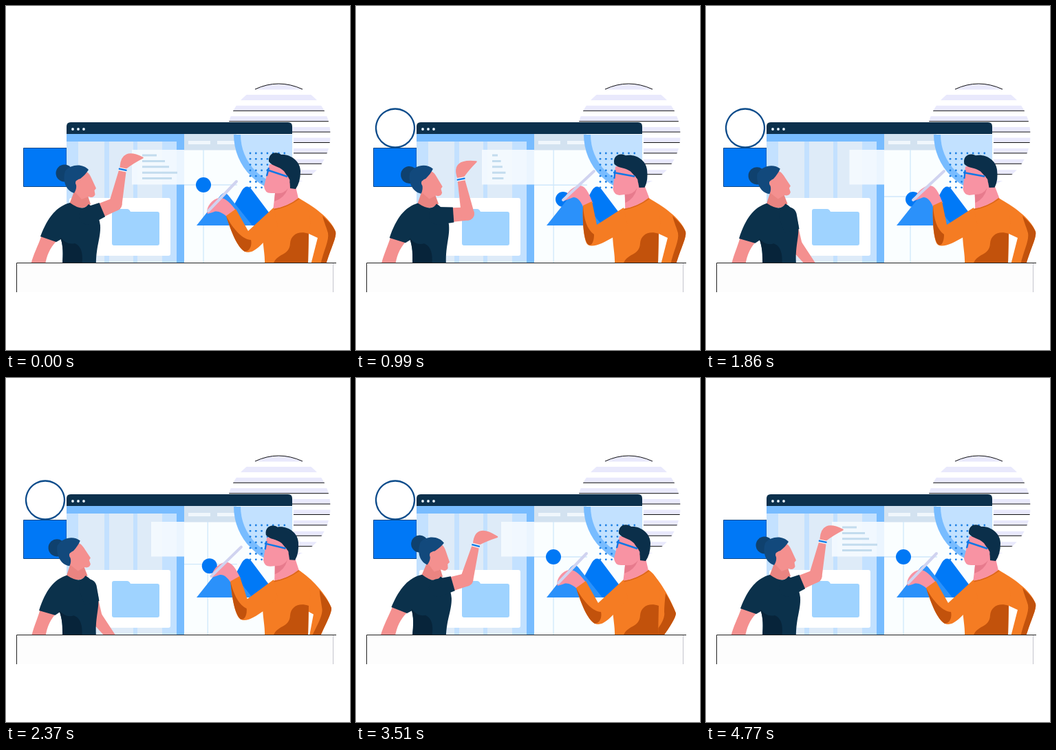
Write an HTML page that moves like this. It is 500 px wide and 500 px high and loops after 4.92 s.

```html
<!DOCTYPE html>
<html>
<head>
<meta charset="utf-8">
<style>
html, body { margin: 0; width: 100%; height: 100%; overflow: hidden; background: #fff; }
svg { display: block; width: 100vw; height: 100vh; }
</style>
</head>
<body>
<svg viewBox="0 0 500 500">
  <defs>
    <clipPath id="disc"><circle cx="396.5" cy="187.5" r="75"/></clipPath>
    <clipPath id="panel"><path d="M259 187H416V375H259Z"/></clipPath>
  </defs>

  <g id="stripes" clip-path="url(#disc)"></g>
  <path d="M362 121Q396 105 431 121" fill="none" stroke="#111"/>
  <path d="M25.5 206.5H88V262.5H25.5Z" fill="#0078f6" stroke="#0b4a8c"/>
  <path id="ring" d="M57 149.5a28 28 0 1 0 .01 0" pathLength="1" fill="none" stroke="#0d4c8b" stroke-width="2.3"/>

  <!-- window -->
  <path d="M88 186H259V375H88Z" fill="#c3e1ff"/>
  <path d="M105 197h38v178h-38zM150 197h35v178h-35zM191 197h36v178h-36z" fill="#deebf8"/>
  <path d="M88 186H259V375H248V197H88Z" fill="#78bcff"/>
  <path d="M259 186H418V375H259Z" fill="#fafeff"/>
  <path d="M259 186H335V209.5H259Z" fill="#d3e2f0"/>
  <path d="M265 196h32v5h-32zM307 196h26v5h-26z" fill="#f0f6fc"/>
  <g clip-path="url(#panel)">
    <circle cx="416" cy="187" r="85" fill="#78bcff"/>
    <circle cx="416" cy="187" r="75" fill="#c2e1ff"/>
  </g>
  <g id="dots" fill="#1b7fe3"></g>
  <path d="M88 186V175Q88 169 94 169H410Q416 169 416 175V186Z" fill="#0b304c"/>
  <path d="M97 179h0M105 179h0M113 179h0" stroke="#e8f4ff" stroke-width="3.8" stroke-linecap="round"/>
  <rect x="92" y="279" width="147" height="84" rx="3" fill="#fff"/>
  <path d="M154 298Q154 295 157 295H176Q179 295 181 299H220Q223 299 223 302V345Q223 348 220 348H157Q154 348 154 345Z" fill="#9fd3ff"/>

  <path id="guides" fill="none" stroke="#cfe8fb" stroke-width="1.3"/>
  <path d="M315 319L343 268Q350 257 358 268L388 308V319Z" fill="#0079f7"/>
  <circle id="ball" r="11" fill="#0078f5"/>
  <path d="M277 319L312 275Q318 268 323 275L358 319Z" fill="#2b91fa"/>
  <rect id="card" y="209" height="50.5" fill="#f5faff" opacity=".93"/>
  <path id="text" fill="none" stroke="#c3dcee" stroke-width="3"/>

  <!-- woman -->
  <g fill="#f4908f" stroke-linejoin="round">
    <path id="upper"/><path id="fore"/>
    <path id="hand" stroke="#f4908f" stroke-width="2"/>
    <path id="band" fill="none" stroke="#fff" stroke-width="5"/>
    <path id="bandBlue" fill="none" stroke="#1b80e6" stroke-width="2.6"/>
  </g>
  <g id="woman">
    <path d="M52 333L74 341C63 352 59 364 57 376H36C40 360 46 350 52 333Z" fill="#f4908f"/>
    <path d="M102 262L92 288Q108 299 123 288L117 270Z" fill="#ea8481"/>
    <path d="M93 286C74 291 61 306 50 335L73 343L80 339C84 355 82 365 82 380H131C130 350 138 338 137 319Q134 297 120 288Q112 300 93 286Z" fill="#0b314b"/>
    <path d="M82 380C83 360 84 352 79 336Q88 348 100 345C112 350 112 365 110 380Z" fill="#07243a"/>
    <g id="womanHead">
      <path d="M106 240C118 237 122 245 125 252L131 265L128.5 268L129.5 274Q127 280 120 277L110 281L98 268Z" fill="#f4908f"/>
      <circle cx="85" cy="243" r="12.5" fill="#0f416e"/>
      <path d="M120 238C112 229 95 229 86 240C82 252 86 268 99 272Q103 266 102 260Q101 252 108 251C113 247 117 243 120 238Z" fill="#12497c"/>
      <circle cx="105" cy="257" r="4" fill="#f4908f"/>
    </g>
  </g>
  <path id="sleeve" fill="#0b314b"/>

  <!-- man -->
  <path id="farArm" fill="#f57c23"/>
  <path id="farShade" fill="#c2520c"/>
  <g id="manHead">
    <path d="M383 230L375 262Q376 272 385 272L391 272L388 298Q404 302 426 284L420 258L412 230Z" fill="#f893a3"/>
    <path d="M391 272Q403 274 410 265Q404 280 390 284Z" fill="#e77b8d"/>
    <path d="M382 226C381 214 392 210 400 216C414 215 428 226 428 240Q428 256 421 266L413 265Q413 250 408 246L404 240C396 232 388 234 382 226Z" fill="#0b2f4a"/>
    <circle cx="408" cy="254" r="4.5" fill="#f893a3"/>
    <path d="M382 235L379 247M379 238L409 248" fill="none" stroke="#0f78e6" stroke-width="2.4"/>
  </g>
  <path d="M387 295Q408 293 425 279C440 288 446 310 440 331L439 376H376C377 360 372 345 373 322Z" fill="#f57c23"/>
  <path d="M388 376C394 358 412 364 413 345C414 332 426 326 440 331L439 376Z" fill="#c2520c"/>
  <path d="M389 296Q410 292 426 280" fill="none" stroke="#d9651a" stroke-width="1.5"/>
  <path id="manHand" fill="#f893a3"/>
  <path id="pen" stroke="#d0d3f0" stroke-width="4" stroke-linecap="round"/>
  <path id="nearArm" fill="#f57c23"/>
  <path id="nearShade" fill="#c2520c"/>

  <!-- desk -->
  <path d="M15 374H476V416H15Z" fill="#fdfdfd"/>
  <path d="M15.5 416V373.5H480" fill="none" stroke="#222"/>
  <path d="M475.500 374V416" stroke="#c4c4cc"/>
</svg>

<script>
const LOOP = 4920, LAST = 4770, STEP = 30;
const $ = id => document.getElementById(id);
const set = (id, attrs) => { for (const k in attrs) $(id).setAttribute(k, attrs[k]); };

const ramp = (t, from, to) => {
  const u = Math.min(1, Math.max(0, (t - from) / (to - from)));
  return u * u * (3 - 2 * u);
};
// Rises from 0 to 1, holds, then falls back.
const pulse = (t, rise, risen, fall, fallen) => ramp(t, rise, risen) - ramp(t, fall, fallen);

// Smooth monotone interpolation through rows of [time, ...values].
function track(rows, t) {
  const next = rows.findIndex(r => r[0] > t);
  if (next < 0) return rows[rows.length - 1].slice(1);
  const i = next - 1, h = rows[next][0] - rows[i][0], u = (t - rows[i][0]) / h;
  return rows[i].slice(1).map((p, n) => {
    const slope = j => rows[j] && rows[j + 1]
      ? (rows[j + 1][n + 1] - rows[j][n + 1]) / (rows[j + 1][0] - rows[j][0]) : 0;
    const tangent = j => {
      const a = slope(j - 1), b = slope(j);
      return a * b > 0 ? 2 * a * b / (a + b) : 0;
    };
    return p + (rows[next][n + 1] - p) * ramp(u, 0, 1)
      + h * u * (1 - u) * ((1 - u) * tangent(i) - u * tangent(next));
  });
}

// Blend two paths of the same structure.
const NUMBER = /-?\d+(\.\d+)?/g;
function mix([a, b], k) {
  const to = b.match(NUMBER);
  let i = 0;
  return a.replace(NUMBER, n => (+n + (to[i++] - n) * k).toFixed(2));
}

const along = (a, b, k) => [a[0] + (b[0] - a[0]) * k, a[1] + (b[1] - a[1]) * k];
const polar = ([x, y], degrees, r) => {
  const a = degrees * Math.PI / 180;
  return [x + r * Math.cos(a), y + r * Math.sin(a)];
};

// Tapered limb, rounded at its start.
function limb(a, b, ra, rb) {
  const angle = Math.atan2(b[1] - a[1], b[0] - a[0]) * 180 / Math.PI - 90;
  return `M${polar(a, angle, ra)}L${polar(b, angle, rb)}L${polar(b, angle, -rb)}` +
    `L${polar(a, angle, -ra)}A${ra} ${ra} 0 0 1 ${polar(a, angle, ra)}Z`;
}

// time, body lean, then the angles of upper arm, forearm and hand
const womanPoses = [
  [0, 0, -23, -78, -27],
  [500, 0, -23, -78, -27],
  [990, -2, -4, -101, -45],
  [1600, -3, 75, 52, 50],
  [2450, -3, 75, 52, 50],
  [2910, -2, 61, 9, 66],
  [3510, 2, -16, -75, -18],
  [4300, 0, -23, -78, -27]
];

// Pen low, pen high
const drawing = {
  nearArm: ['M389 293L352 327L334 295L320 305C328 330 336 350 347 357C357 361 366 352 376 342L395 320Z',
            'M389 293L350 318L343 284L330 290C329 315 331 342 337 347C345 352 360 344 374 336L395 320Z'],
  nearShade: ['M320 305C330 325 345 340 356 340C358 348 354 357 347 357C336 350 328 330 320 305Z',
              'M330 290C331 310 336 325 346 332C346 340 344 349 338 347C331 342 329 315 330 290Z'],
  manHand: ['M335 298L321 306C314 300 306 296 300 300L293 302C290 296 296 284 306 280C316 276 325 284 335 298Z',
            'M344 286L330 292C327 284 322 278 316 278L303 283C303 276 310 267 318 263C330 257 336 265 344 286Z'],
  pen: ['M335 255L294 298', 'M346 240L301 282']
};
// Elbow out, elbow in
const leaning = {
  farArm: ['M425 279C445 290 472 308 479 328C481 336 472 352 465 376L443 376L453 337L440 331L425 315Z',
           'M425 279C440 290 458 322 465 342C465 348 456 362 446 376L438 376L439 352L438 350L425 315Z'],
  farShade: ['M460 305C468 312 476 320 479 328C481 336 472 352 465 376L457 376C462 355 470 340 468 330C466 322 462 314 460 305Z',
             'M450 313C456 322 462 334 465 342C465 348 456 362 446 376L428 376C440 365 450 350 448 340C448 332 449 322 450 313Z']
};

for (let i = 0; i < 10; i++) {
  const end = 121.5 + 15.4 * i, height = 8 - .2 * i;
  $('stripes').innerHTML += `<path d="M320 ${end - height}H474V${end}H320Z" fill="#e9e9fc"/>` +
    (i > 1 ? `<path d="M320 ${end}H474" stroke="#111"/>` : '');
}
for (let i = 0; i < 49; i++)
  $('dots').innerHTML += `<circle cx="${355 + i % 7 * 8.3}" cy="${214 + (i / 7 | 0) * 8.3}" r="1.4"/>`;

function drawWoman(t) {
  const [lean, upper, fore, palm] = track(womanPoses, t);
  const shoulder = [119, 305], elbow = polar(shoulder, upper, 43.5), wrist = polar(elbow, fore, 54);
  const knuckle = polar(wrist, fore - 16, 30), tip = polar(wrist, palm, 32);
  const cuff = along(wrist, elbow, .05), across = fore - 90;
  const band = `M${polar(cuff, across, 6)}L${polar(cuff, across, -6)}`;
  set('woman', { transform: `rotate(${lean} 105 374)` });
  set('womanHead', { transform: `rotate(${lean * 2} 106 285)` });
  set('upper', { d: limb(elbow, shoulder, 9.5, 11) });
  set('fore', { d: limb(elbow, wrist, 9.5, 5) });
  set('hand', { d: `M${polar(wrist, across, 4)}Q${knuckle} ${tip}Q${along(wrist, tip, .5)} ${polar(wrist, across, -4)}Z` });
  set('band', { d: band });
  set('bandBlue', { d: band });
  set('sleeve', { d: limb(shoulder, along(shoulder, elbow, .52), 13, 11) });
}

function drawMan(t) {
  const raise = pulse(t, 250, 850, 2100, 2750), bend = pulse(t, 2050, 2750, 3650, 4400);
  for (const id in drawing) set(id, { d: mix(drawing[id], raise) });
  for (const id in leaning) set(id, { d: mix(leaning[id], bend) });
  set('manHead', { transform: `rotate(${-8 * raise} 405 275)` });
  set('ball', { cx: 287 + 14 * raise, cy: 260 + 21 * raise });
}

function drawScreen(t) {
  const guide = pulse(t, 950, 1500, 2100, 2750);
  const x = 183 + 28 * pulse(t, 1250, 2000, 3560, 4200);
  const typed = 1 - pulse(t, 700, 1200, 4120, 4700);
  const ring = pulse(t, 150, 900, 3560, 4110);
  const lines = [21, 33, 39, 51, 43].map((w, i) => `M198 ${217 + i * 8.4}h${w * typed}`);
  set('guides', { d: `M${287 + 10 * guide} 209V374M259 ${260 + 17 * guide}H336` });
  set('card', { x, width: 259 - x });
  set('text', { d: typed > 0 ? lines.join('') : '' });
  set('ring', { 'stroke-dasharray': `${ring} 2`, visibility: ring > 0 ? 'visible' : 'hidden' });
}

const start = performance.now();
function frame() {
  const elapsed = (performance.now() - start) % LOOP;
  const t = Math.min(Math.floor(elapsed / STEP) * STEP, LAST);
  drawScreen(t);
  drawWoman(t);
  drawMan(t);
  requestAnimationFrame(frame);
}
frame();
</script>
</body>
</html>
```
